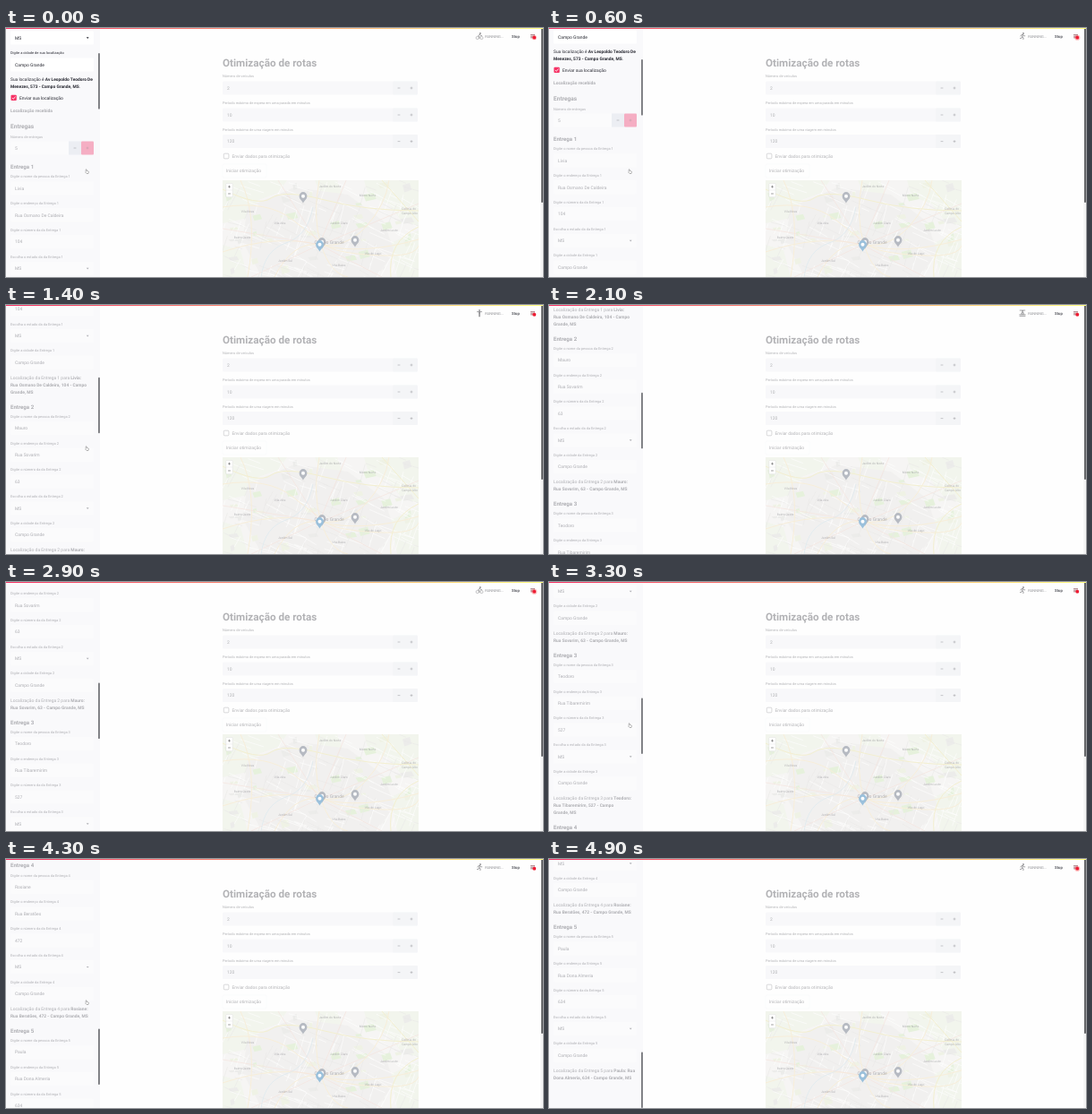
An HTML page that plays this animation: 600 px wide and 278 px high, repeating every 5000 ms.

```html
<!DOCTYPE html>
<html lang="pt">
<head>
<meta charset="utf-8">
<style>
html, body { margin: 0; height: 100%; overflow: hidden; background: #fefefe; }
svg { display: block; width: 100vw; height: 100vh; }
text { font-family: Roboto, "Noto Sans", sans-serif; fill: #262730; text-rendering: geometricPrecision; white-space: pre; }
.b { font-weight: 700; }
.stale { opacity: .35; }
</style>
</head>
<body>
<svg id="stage" viewBox="0 0 600 278"></svg>
<script>
const LABEL = 3.98, BODY = 4.95;

// Drawing helpers; y is the vertical middle of the text or field.
const text = (x, y, s, size = BODY, attrs = '') =>
  `<text x="${x}" y="${y + size * .35}" font-size="${size}" ${attrs}>${s}</text>`;
const bold = (x, y, s, size = BODY, attrs = '') => text(x, y, s, size, 'class="b" ' + attrs);
const strong = s => `<tspan class="b">${s}</tspan>`;
const rect = (x, y, w, h, fill, r = 0, attrs = '') =>
  `<rect x="${x}" y="${y}" width="${w}" height="${h}" rx="${r}" fill="${fill}" ${attrs}/>`;
const path = (d, stroke, width = 1, fill = 'none', attrs = '') =>
  `<path d="${d}" stroke="${stroke}" stroke-width="${width}" fill="${fill}" ${attrs}/>`;
const group = (body, attrs = '') => `<g ${attrs}>${body}</g>`;

const field = (y, value) => rect(5, y - 7.5, 93, 15, '#fff', 1.2) + text(10, y, value);
const select = (y, value) => field(y, value) + path(`M89.8 ${y - .7}h2.8l-1.4 1.7z`, 'none', 0, '#262730');
const sign = (x, y, plus, color = '#262730') =>
  path(`M${x - 1.4} ${y}h2.8` + (plus ? `M${x} ${y - 1.4}v2.8` : ''), color, .7);

// Sidebar
const deliveries = [
  ['Livia', 'Rua Osmano De Caldeira', 104, ['Livia:'], ['Rua Osmano De Caldeira, 104 - Campo', 'Grande, MS']],
  ['Mauro', 'Rua Sovarim', 63, ['Mauro:'], ['Rua Sovarim, 63 - Campo Grande, MS']],
  ['Teodoro', 'Rua Tibaremirim', 527, ['Teodoro:'], ['Rua Tibaremirim, 527 - Campo', 'Grande, MS']],
  ['Rosiane', 'Rua Beratões', 472, ['Rosiane:'], ['Rua Beratões, 472 - Campo Grande, MS']],
  ['Paula', 'Rua Dona Almeria', 634, ['Paula: Rua'], ['Dona Almeria, 634 - Campo Grande, MS']]
];

function delivery([name, street, number, head, lines], n, y) {
  const inputs = [
    ['Digite o nome da pessoa da', name], ['Digite o endereço da', street],
    ['Digite o número da da', number], ['Escolha o estado da da', 'MS'], ['Digite a cidade da', 'Campo Grande']
  ];
  return bold(5, y, 'Entrega ' + n, 6.1) +
    inputs.map(([label, value], i) =>
      text(5, y + 11 + i * 29.75, `${label} Entrega ${n}`, LABEL) +
      (i === 3 ? select : field)(y + 24 + i * 29.8, value)).join('') +
    text(5, y + 160, `Localização da Entrega ${n} para ${strong(head)}`) +
    lines.map((s, i) => bold(5, y + 168 + i * 8, s, 4.9)).join('');
}

function sidebar() {
  const live = select(11, 'MS') + text(5, 28, 'Digite a cidade de sua localização', LABEL) +
    field(41, 'Campo Grande') +
    text(5, 57.3, 'Sua localização é ' + strong('Av Leopoldo Teodoro De'), 4.85) +
    text(5, 65.2, strong('Menezes, 573 - Campo Grande, MS') + '.', 4.85) +
    rect(5.5, 74.8, 6.3, 6.3, '#f63366', 1) + path('M7 78l1.3 1.4 2.2-2.9', '#fff', .8) +
    text(15, 78, 'Enviar sua localização');
  let stale = bold(5, 92.3, 'Localização recebida') + bold(5, 110, 'Entregas', 6.6) +
    text(5, 121.3, 'Número de entregas', LABEL) +
    rect(5, 126.5, 65, 15, '#fff', 1.2) + text(10, 134, '5') +
    rect(70, 126.5, 14, 15, '#d5dce6') + sign(77, 134) +
    rect(84, 126.5, 14, 15, '#f0255c', 1) + sign(91, 134, true, '#700020');
  let y = 155;
  deliveries.forEach((d, i) => {
    stale += delivery(d, i + 1, y);
    y += 168.5 + 8 * (1 + d[4].length);
  });
  return rect(0, 0, 105, 278, '#f9f9fb') + group(live + group(stale, 'class="stale"'), 'id="list"') +
    rect(103, 0, 1.9, 62.5, '#7b7c80', .9, 'id="thumb"');
}

// Map
function rng(seed) {
  return () => (seed = (seed * 16807) % 2147483647) / 2147483647;
}

function pin(x, y, color) {
  return path(`M${x} ${y + 6.5}C${x - 2} ${y + 3} ${x - 4.4} ${y + 2} ${x - 4.4} ${y - 1.5}a4.4 4.4 0 0 1 8.8 0C${x + 4.4} ${y + 2} ${x + 2} ${y + 3} ${x} ${y + 6.5}z`, 'none', 0, color) +
    `<circle cx="${x}" cy="${y - 1.3}" r="2" fill="#fff"/>`;
}

function map() {
  const rand = rng(77);
  let s = rect(242, 170, 219, 108, '#f0efec');
  s += path('M242 170h72l-10 14-22 8-12 20-28 6zM400 170h61v52l-20-8-14-18-22-8zM430 240l31-14v52h-24zM242 242l20 6 8 30h-28zM345 170h25l6 16-20 8z', 'none', 0, '#e9eee0');
  s += path('M270 200l52-22 60 8 40 30 12 34-20 28H286l-22-40z', 'none', 0, '#e8e6e4');
  for (let i = 0; i < 40; i++) {
    const x = 244 + rand() * 205, y = 172 + rand() * 98, w = 3 + rand() * 10, h = 2 + rand() * 6;
    s += path(`M${x} ${y}l${w} ${-h / 3} ${w / 4} ${h} ${-w} ${h / 3}z`, 'none', 0, ['#d3e8c2', '#dededb', '#e4ead2'][i % 3]);
  }
  for (let i = 0; i < 190; i++) {
    const x = 242 + rand() * 219, y = 170 + rand() * 108, a = (rand() < .5 ? .25 : 1.8) + rand() * .3, r = 8 + rand() * 26;
    s += path(`M${x} ${y}l${r * Math.cos(a)} ${r * Math.sin(a)}`, i % 3 ? '#fff' : '#d9d7d6', .6);
  }
  s += path('M242 200q50-8 78 14t40 30 60 10 41-20M300 278q20-40 50-36t52-20 26-52M262 170q20 40 8 108M350 170q-8 40 2 72t30 36M242 250q60-20 108-8t111-6', '#f3e2bd', 1);
  s += path('M304 170l46 72 70 36M380 170l-30 72-76 36M242 224l110 18 109-46', '#eed0c6', .7);
  s += path('M242 180q40 20 54 10t60 2 105 12M420 170l41 46M430 278q-4-40 31-56', '#ebe4ac', 1);
  s += path('M285 278q4-30 28-38t30-40', '#c0d8e4', .7);
  [[362, 177, 'Jardim do Norte'], [404, 187, 'Morro Norte'], [450, 202, 'Colônia do'], [451, 207, 'Campo Alto'],
   [270, 205, 'Vila Nova'], [306, 218, 'Vila Alta'], [372, 218, 'Jardim Claro'], [264, 234, 'Bairro Oeste'],
   [410, 252, 'Vila do Lago'], [312, 260, 'Jardim Sul'], [372, 265, 'Vila Baixa'], [428, 226, 'Jardim Leste']
  ].forEach(([x, y, label]) => s += text(x, y, label, 3.4, 'text-anchor="middle" fill-opacity=".6"'));
  s += text(361, 239, 'Campo Grande', 5, 'text-anchor="middle" fill-opacity=".6"');
  s += pin(332, 189, '#7c8492') + pin(390, 238, '#7c8492') + pin(353, 240, '#7c8492') + pin(350.5, 243, '#4a8fc0');
  s = group(s, 'opacity=".55" clip-path="url(#mapClip)"');
  return s + rect(245.8, 173.4, 7.4, 15.4, '#fff', 1, 'stroke="#ddd" stroke-width=".5"') +
    path('M246 181h7', '#ddd', .4) + sign(249.5, 177.2, true, '#777') + sign(249.5, 185, false, '#777');
}

// Main column
function mainColumn() {
  const number = (y, label, value) => text(242, y - 13.3, label, LABEL) +
    rect(242, y - 7.5, 218, 15, '#edeff4', 1.2) + rect(432, y - 7.5, 28, 15, '#e2e5ec', 1.2) +
    text(247, y, value) + sign(439, y) + sign(453, y, true);
  return group(bold(242, 39, 'Otimização de rotas', 11.7) +
    number(67, 'Número de veículos', '2') +
    number(97, 'Período máximo de espera em uma parada em minutos', '10') +
    number(126.6, 'Período máximo de uma viagem em minutos', '120') +
    rect(243.3, 140.2, 5.6, 5.6, '#fff', 1, 'stroke="#262730" stroke-width=".5"') +
    text(252.5, 143, 'Enviar dados para otimização') +
    rect(242, 152, 49, 15, 'none', 1.2, 'stroke="#e6e8ee" stroke-width=".4"') +
    text(246, 159.5, 'Iniciar otimização'), 'class="stale"') + map();
}

// Small sport figures in an 8 x 8 box
const INK = '#8c8c8f';
const head = (x, y) => `<circle cx="${x}" cy="${y}" r=".9" fill="${INK}"/>`;
const wheel = x => `<circle cx="${x}" cy="6" r="1.6" fill="none" stroke="${INK}" stroke-width=".5"/>`;
const limbs = d => path(d, INK, .8, 'none', 'stroke-linecap="round"');
const sports = {
  b: wheel(1.7) + wheel(6.4) + head(4.9, 1) + limbs('M4.3 2.2L2.6 3.7l1.5 1L3.9 6.5M4.3 2.2l1 1.2h1.2'),
  r: head(5, 1) + limbs('M4.5 2.4L3.7 4.8l1.4 1L4.9 7.6M3.7 4.8L3.1 6.2 1.5 6.5M4.5 2.4L2.6 2.8 2 4M4.5 2.4l1 1.4h1.3'),
  s: head(4, 1) + limbs('M1.5 2.6h5M4 2.6v2.2M3.6 2.8v5M4.4 2.8v5'),
  w: head(4.2, 1.8) + limbs('M3.6 3.2L2.7 5h2.8M3.6 3.2l2 .8M1.2 1h5.6M.8 5.8h6.4M1 7.3h6')
};
const sequence = 'bwsrbwrsbrswbrsbwrbwsbrwsr';

const header = text(535.3, 9.3, 'RUNNING...', 4, 'fill-opacity=".5"') +
  bold(565, 9.2, 'Stop', 4.3, 'fill-opacity=".75"') +
  path('M586 7.6h5M586 9.2h5M586 10.8h5', '#8a5058', .7) +
  `<circle id="halo" cx="590.3" cy="10.7" fill="#ff2b2b" opacity=".3"/><circle cx="590.3" cy="10.7" r="1.9" fill="#ee1c34"/>`;

const cursor = path('M89.2 160.6v-2.6q.5-.8 1 0v1.5l1.9.5q.4.2.3.8l-.4 1.7h-2l-1.3-1.6z', '#666', .45, '#fff');

document.getElementById('stage').innerHTML =
  `<defs><linearGradient id="bar"><stop stop-color="#f63366"/><stop offset="1" stop-color="#fffd80"/></linearGradient>
  <clipPath id="mapClip"><rect x="242" y="170" width="219" height="108"/></clipPath></defs>` +
  mainColumn() + sidebar() + header + group('', 'id="sport" transform="translate(525 5)"') +
  group(cursor, 'id="cursor"') + rect(597.2, 0, 2.8, 278, '#f4f4f4') +
  rect(598, 0, 2, 195, '#66676a', .9) + rect(0, 0, 600, 1, 'url(#bar)');

const [list, thumb, sport, pointer, halo] =
  ['list', 'thumb', 'sport', 'cursor', 'halo'].map(id => document.getElementById(id));

// Scroll offset of the sidebar: [ms, px]
const stops = [[0, 0], [600, 31], [1400, 234], [2100, 310], [2900, 375.5], [3900, 563], [4600, 833], [5000, 833]];

function scrollAt(t) {
  const i = stops.findIndex(p => p[0] > t);
  const [t0, y0] = stops[i - 1], [t1, y1] = stops[i];
  return y0 + (y1 - y0) * (t - t0) / (t1 - t0);
}

let shown = '';
function draw(now) {
  const t = Math.floor(now % 5000 / 100) * 100;
  const y = scrollAt(t);
  list.setAttribute('transform', `translate(0 ${-y})`);
  thumb.setAttribute('y', (y + 125) * .2249);
  const kind = sequence[Math.floor((t + 100) / 200)];
  if (kind !== shown) sport.innerHTML = sports[shown = kind];
  halo.setAttribute('r', 2.6 - .8 * Math.sin(t / 1000 * Math.PI * 2));
  pointer.setAttribute('visibility', t < 1800 || t >= 3300 && t < 4400 ? 'visible' : 'hidden');
}

const start = performance.now();
function tick(now) {
  draw(Math.max(0, now - start));
  requestAnimationFrame(tick);
}
draw(0);
requestAnimationFrame(tick);
</script>
</body>
</html>
```
